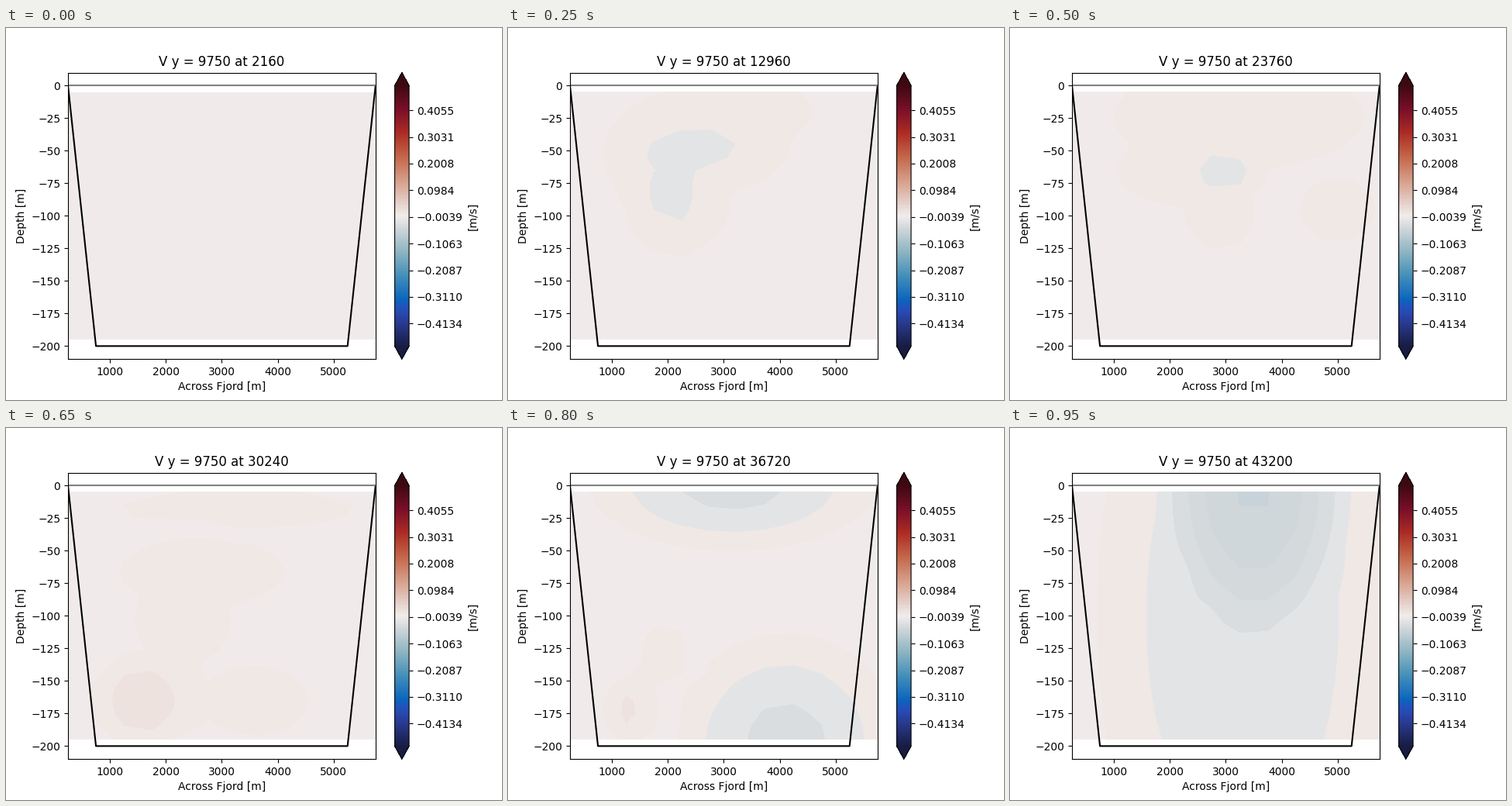
A matplotlib script for the animation above (1000 ms loop, 640 by 480 pixels).

```python
import numpy as np
import matplotlib.pyplot as plt
from matplotlib.animation import FuncAnimation
from matplotlib.cm import ScalarMappable
from matplotlib.colors import BoundaryNorm, LinearSegmentedColormap

FRAMES = 20
TIME_STEP = 2160

# Flow cells at key steps: x [km], depth [m], half width, half height, peak.
# The outline of a cell is where its strength is 1; the sign gives direction.
CELLS = {
    0: [],
    3: [(2.63, 26, 1.65, 28, 1.4), (1.64, 45, 0.65, 42, 1.4)],
    7: [(2.47, 90, 1.75, 82, 1.6), (3.7, 15, 1.3, 28, 1.4),
        (2.53, 54, 1.8, 40, 3.3), (2.2, 88, 1.05, 56, 3.8)],
    10: [(3.24, 24, 2.25, 40, 1.5), (2.33, 66, 1.3, 26, 1.4),
         (2.9, 98, 0.65, 28, 1.4), (5.0, 95, 0.7, 25, 1.3),
         (2.95, 66, 0.8, 23, 2.5)],
    13: [(3.3, 18, 2.1, 15, 1.4), (2.65, 66, 1.5, 27, -1.4),
         (2.3, 104, 0.9, 35, -1.4), (1.6, 165, 0.95, 38, -2.8),
         (3.58, 165, 1.0, 28, -1.4)],
    16: [(3.16, 0, 2.55, 50, 3.3), (4.1, 198, 2.0, 85, 3.3),
         (1.35, 172, 0.55, 27, -2.3), (1.95, 130, 0.5, 24, -1.4)],
    19: [(3.3, 100, 2.6, 260, 2.95), (3.5, 0, 2.1, 160, 6.1)],
}

# Bands of signed strength, from the positive flow to the fast return jet
BOUNDS = [-9, -2, -1, 1, 2, 3, 4, 5, 6, 9]
BANDS = ["#eee2de", "#f0e8e5", "#f0ebea", "#f0e8e5", "#e3e4e6",
         "#d9dddf", "#d4d9dc", "#d0d7da", "#c8d3d9"]

BALANCE = [(0, "#171c42"), (1 / 11, "#293a8f"), (0.14, "#274cb8"),
           (2 / 11, "#0b66bd"), (3 / 11, "#4590b9"), (4 / 11, "#8eb5c2"),
           (5 / 11, "#d2d8db"), (0.5, "#f1eceb"), (6 / 11, "#e6d2cc"),
           (7 / 11, "#d59d89"), (8 / 11, "#c46548"), (9 / 11, "#ac2b24"),
           (10 / 11, "#780e28"), (1, "#3c0911")]

# Model grid: 500 m across, 10 m deep
x, z = np.meshgrid(np.arange(0.25, 6, 0.5), np.arange(5, 200, 10))


def strength(cells):
    """Field of the strongest cell at each grid node."""
    field = np.zeros(x.shape)
    for cx, cz, rx, rz, peak in cells:
        r2 = ((x - cx) / rx) ** 2 + ((z - cz) / rz) ** 2
        cell = np.sign(peak) * abs(peak) ** (1 - r2 ** 1.25)
        field = np.where(abs(cell) > abs(field), cell, field)
    return field


STEPS = sorted(CELLS)
KEY_FIELDS = [strength(CELLS[step]) for step in STEPS]


def field_at(frame):
    place = np.interp(frame, STEPS, range(len(STEPS)))
    k = min(int(place), len(STEPS) - 2)
    return KEY_FIELDS[k] + (place - k) * (KEY_FIELDS[k + 1] - KEY_FIELDS[k])


fig, ax = plt.subplots(figsize=(6.4, 4.8), dpi=100)

levels = np.linspace(-0.5, 0.5, 255)
balance = LinearSegmentedColormap.from_list("balance", BALANCE)
norm = BoundaryNorm(levels, balance.N, extend="both")
bar = fig.colorbar(ScalarMappable(norm, balance), ax=ax, ticks=levels[22::26],
                   spacing="proportional")
bar.set_label("[m/s]")
bar.minorticks_off()

ax.plot([250, 750, 5250, 5750], [0, -200, -200, 0], color="black")
ax.plot([250, 5750], [0, 0], color="gray")
ax.set(xlim=(250, 5750), ylim=(-210, 10),
       xlabel="Across Fjord [m]", ylabel="Depth [m]")
title = ax.set_title("")
layers = []


def draw(frame):
    while layers:
        layers.pop().remove()
    layers.append(ax.contourf(1000 * x, -z, field_at(frame), levels=BOUNDS,
                              colors=BANDS))
    title.set_text(f"V y = 9750 at {TIME_STEP * (frame + 1)}")
    return [title]


anim = FuncAnimation(fig, draw, frames=FRAMES, interval=50, repeat=True,
                     init_func=lambda: draw(0))
plt.show()
```
